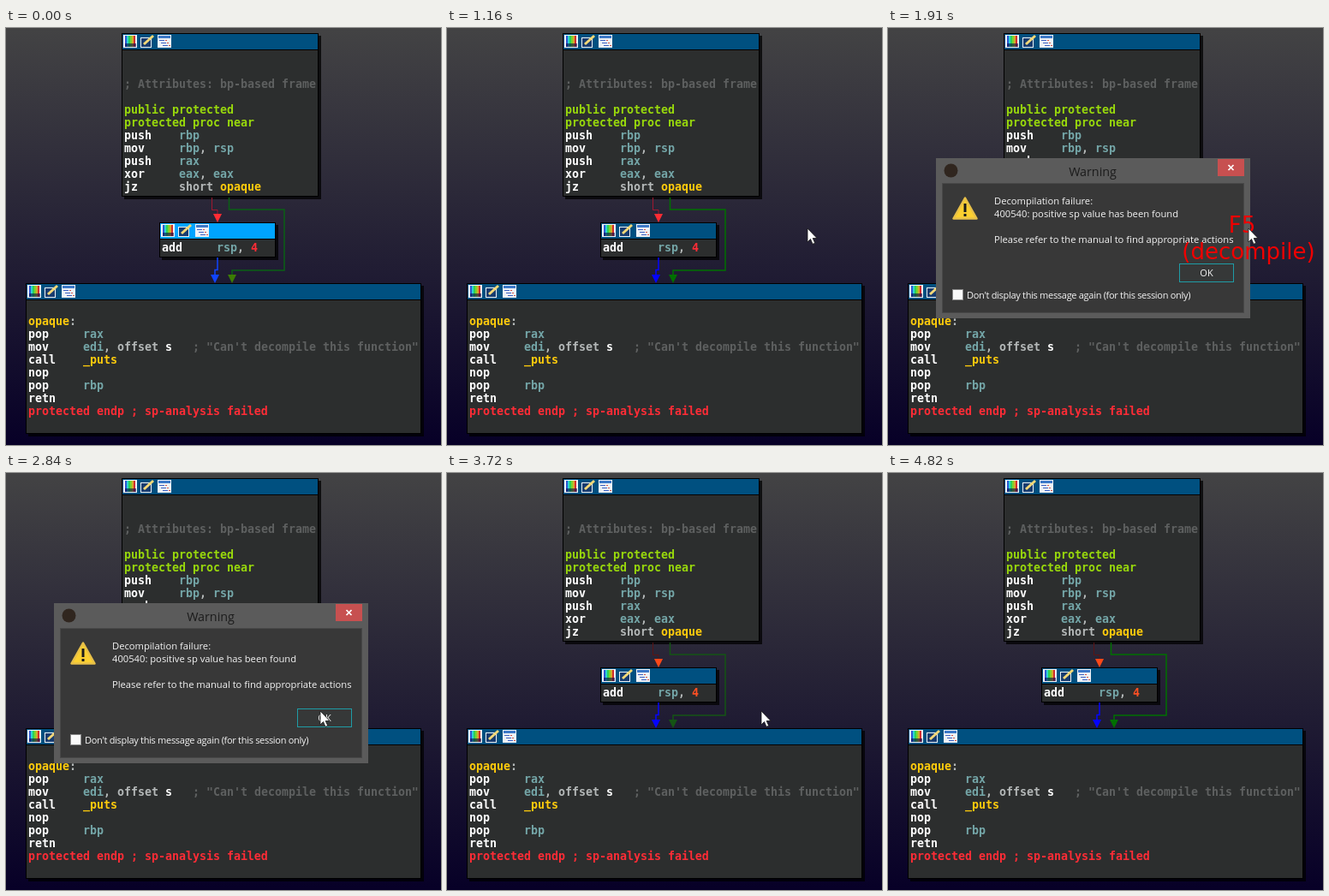
Recreate the animation shown at these times as an HTML page with a canvas. Size 508 px wide and 487 px high, loop 5380 ms.

```html
<!DOCTYPE html>
<html lang="en">
<head>
<meta charset="utf-8">
<title>Decompilation failure</title>
<style>
html, body { margin: 0; width: 100%; height: 100%; overflow: hidden; background: #222028; }
canvas { display: block; width: 508px; height: 487px; }
</style>
</head>
<body>
<canvas id="stage" width="508" height="487"></canvas>
<script>
const W = 508, H = 487, LOOP = 5380, STEP = 60, LINE = 15, CELL = 8;
const ctx = document.getElementById('stage').getContext('2d');
const MONO = 'bold 13.29px "DejaVu Sans Mono", monospace';
const SANS = '"Open Sans", "Noto Sans", sans-serif';
const BIG = '26px "DejaVu Sans", Verdana, sans-serif';

const ENTRY = [
  '; Attributes: bp-based frame',
  '',
  'public protected',
  'protected proc near',
  'push    rbp',
  'mov     rbp, rsp',
  'push    rax',
  'xor     eax, eax',
  'jz      short opaque'
];
const EXIT = [
  'opaque:',
  'pop     rax',
  'mov     edi, offset s   ; "Can\'t decompile this function"',
  'call    _puts',
  'nop',
  'pop     rbp',
  'retn',
  'protected endp ; sp-analysis failed'
];

// The first rule that matches at a position colours that token.
const RULES = [
  [/^public.*|^.* proc near/y, '#98d80c'],
  [/^.* endp.*/y, '#ff2c36'],
  [/;.*/y, '#5e6060'],
  [/opaque|_puts/y, '#ffcb0c'],
  [/[re](ax|bp|sp|di)\b/y, '#74a6a8'],
  [/^\w+|s\b/y, '#ffffff'],
  [/\d+/y, 'number'],
  [/\w+|./y, '#b4b8b8']
];

// The pointer jumps once per STEP until it rests at the end of a move.
const MOVES = [
  { at: 360, until: 670, steps: 5, from: [434, 418], to: [425, 342] },
  { at: 670, until: 920, steps: 3, from: [425, 342], to: [409, 293] },
  { at: 920, until: 2530, steps: 0, to: [420, 233] },
  { at: 2530, until: 4450, steps: 2, from: [403, 246], to: [366, 277] },
  { at: 4450, until: 4510, steps: 0, to: [461, 387] },
  { at: 4760, until: 4820, steps: 0, to: [499, 480] }
];

function pointer(t) {
  const m = MOVES.find(m => t >= m.at && t < m.until);
  if (!m) return null;
  const k = Math.floor((t - m.at) / STEP);
  if (k >= m.steps) return m.to;
  return m.from.map((v, i) => Math.round(v + (m.to[i] - v) * k / m.steps));
}

function rect(x, y, w, h, color) {
  ctx.fillStyle = color;
  ctx.fillRect(x, y, w, h);
}

function frame(x, y, w, h, color) {
  ctx.strokeStyle = color;
  ctx.lineWidth = 1;
  ctx.strokeRect(x + .5, y + .5, w - 1, h - 1);
}

function trace(points) {
  ctx.beginPath();
  points.forEach(([x, y]) => ctx.lineTo(x, y));
}

function fill(points, color) {
  trace(points);
  ctx.fillStyle = color;
  ctx.fill();
}

function line(points, color, width = 1) {
  trace(points);
  ctx.strokeStyle = color;
  ctx.lineWidth = width;
  ctx.stroke();
}

function text(str, x, y, font, color, align = 'left', spacing = '0px') {
  ctx.font = font;
  ctx.fillStyle = color;
  ctx.textAlign = align;
  ctx.letterSpacing = spacing;
  ctx.fillText(str, x, y);
}

function codeLine(str, x, y, number) {
  for (let i = 0; i < str.length;) {
    for (const [rule, color] of RULES) {
      rule.lastIndex = i;
      const hit = rule.exec(str);
      if (!hit) continue;
      text(hit[0], x + i * CELL, y, MONO, color === 'number' ? number : color);
      i += hit[0].length;
      break;
    }
  }
}

function listing(lines, x, y, number) {
  lines.forEach((str, i) => codeLine(str, x, y + i * LINE, number));
}

function icons(x, y) {
  for (let i = 0; i < 3; i++) rect(x + i * 20, y, 16, 15, i === 1 ? 'transparent' : '#eef2f6');
  // colour pens
  for (let i = 0; i < 6; i++) {
    rect(x + 2 + i * 2, y + 1, 2, 13, `hsl(${225 - i * 45}, 65%, 50%)`);
  }
  rect(x + 2, y + 10, 13, 4, 'rgba(8,8,70,.6)');
  // notebook and pencil
  rect(x + 20, y + 3, 13, 12, '#eef2f6');
  rect(x + 21, y + 4, 11, 10, '#183c70');
  line([[x + 24, y + 11], [x + 35, y + 1]], '#f4d878', 3);
  // window with lines
  rect(x + 41, y + 1, 14, 3, '#3c78c8');
  for (let i = 0; i < 3; i++) {
    rect(x + 42 + i * 2, y + 6 + i * 3, 6, 1, '#3c60c0');
    rect(x + 49 + i * 2, y + 6 + i * 3, 2, 1, '#d05048');
  }
}

function node(x, y, w, h, head = '#005080') {
  rect(x + 3, y + 3, w, h, 'rgba(0,0,0,.75)');
  rect(x, y, w, h, '#000');
  rect(x + 1, y + 1, w - 2, 18, head);
  rect(x + 1, y + 20, w - 2, h - 21, '#2c2e2e');
  icons(x + 2, y + 2);
}

function edge(points, color, head, width) {
  line(points, color, width);
  const [x, y] = points[points.length - 1];
  fill([[x - 5, y], [x + 5, y], [x, y + 10]], head);
}

function graph(t, hot) {
  const early = t < 850, late = t >= 3650, faded = late && t < 4450;
  const bg = ctx.createLinearGradient(0, 0, 0, H);
  bg.addColorStop(0, '#434344');
  bg.addColorStop(1, '#070027');
  rect(0, 0, W, H, bg);

  node(135, 6, 230, 191);
  listing(ENTRY, 138, 70);
  node(179, 227, 136, 41, t < 1160 ? '#00a4ff' : '#005080');
  codeLine('add     rsp, 4', 182, 261, late ? '#ff5024' : '#ff2c36');
  node(23, 298, 462, 176);
  listing(EXIT, 26, 347);

  const cyan = hot && '#00f0f0';
  const green = cyan || (early ? '#0a6014' : faded ? '#145414' : '#007000');
  const blue = cyan || (early ? '#1044ff' : '#0404ff');
  edge([[240.5, 198], [240.5, 212.5], [247, 212.5], [247, 217]],
    late ? '#5a1414' : '#a01830', late ? '#ff4818' : '#ff2c34', 1);
  edge([[260.5, 198], [260.5, 212], [325, 212], [325, 283], [264, 283], [264, 288]],
    green, cyan || (early ? '#3c7c04' : green), 1.5);
  edge([[247, 268], [247, 282.5], [244, 282.5], [244, 288]], blue, blue, 1.5);
}

function dialog(pressed) {
  const ink = '#f4f4f4', body = '11.2px ' + SANS, small = '11px ' + SANS;
  rect(56, 152, 367, 187, '#5b5b5b');
  rect(64, 182, 352, 150, '#383838');
  frame(63, 181, 353, 152, '#484848');

  ctx.beginPath();
  ctx.arc(73.5, 166.5, 8, 0, Math.PI * 2);
  ctx.fillStyle = '#30261f';
  ctx.fill();
  text('Warning', 239, 173, '14.3px ' + SANS, '#1c1c1c', 'center');

  rect(385, 153, 31, 20, '#c75050');
  for (const d of [-3, 3]) line([[400.5 - d, 160], [400.5 + d, 166]], '#fff', 1.7);

  const sign = [[90, 198.5], [76.5, 222.5], [103.5, 222.5]];
  ctx.lineJoin = 'round';
  fill(sign, '#fcd030');
  line([...sign, sign[0], sign[1]], '#e8c048', 2.5);
  ctx.lineJoin = 'miter';
  rect(88.5, 205, 3, 10, '#1c1c1c');
  rect(88.5, 217, 3, 3, '#1c1c1c');

  text('Decompilation failure:', 124, 206, body, ink);
  text('400540: positive sp value has been found', 124, 221, body, ink);
  text('Please refer to the manual to find appropriate actions', 124, 251, body, ink);

  rect(340, 275, 64, 22, pressed ? '#2b2b2b' : '#363838');
  frame(340, 275, 64, 22, '#1f9ca6');
  text('OK', 372, 290, small, ink, 'center');

  rect(75, 305, 13, 13, '#fafafa');
  frame(75, 305, 13, 13, '#8a8a8a');
  text("Don't display this message again (for this session only)", 92, 316,
    small, ink, 'left', '-0.3px');
}

// The closing window fades while shrinking a little.
function closing() {
  ctx.save();
  ctx.globalAlpha = .45;
  ctx.translate(240, 245);
  ctx.scale(.96, .96);
  ctx.translate(-240, -245);
  dialog(false);
  ctx.restore();
}

function keyHint() {
  text('F5', 413.5, 239, BIG, '#f00000', 'center');
  text('(decompile)', 421, 270, BIG, '#f00000', 'center');
}

function arrow([x, y]) {
  const shape = [[1, 1], [1, 17], [4.5, 13.5], [7, 19.3], [9.7, 18.2], [7.2, 12.5], [12, 12.5], [1, 1]]
    .map(([dx, dy]) => [x + dx, y + dy]);
  fill(shape, '#fff');
  line(shape, '#181818', .8);
}

function draw(t) {
  const pos = pointer(t);
  const hot = pos && pos[0] < 485 && pos[1] >= 298 && pos[1] < 474;
  graph(t, hot);
  if (t >= 1910 && t < 3650) dialog(t >= 3470);
  if (t >= 3650 && t < 3720) closing();
  if (t >= 1780 && t < 1970) keyHint();
  if (pos) arrow(pos);
}

const start = performance.now();
function tick() {
  draw((performance.now() - start) % LOOP);
  requestAnimationFrame(tick);
}
tick();
</script>
</body>
</html>
```
